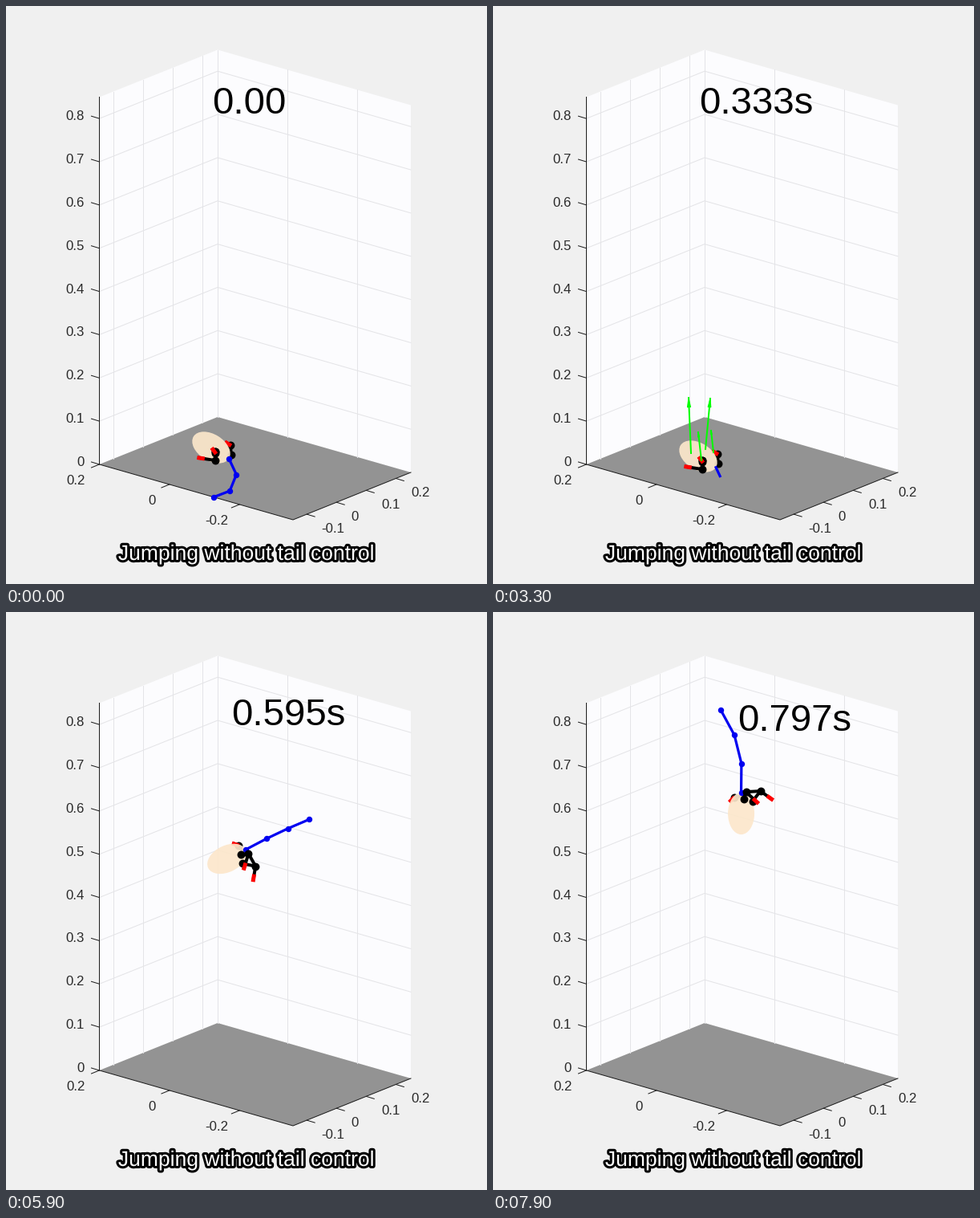
A matplotlib script for the animation above (8000 ms loop, 600 by 720 pixels).

```python
import numpy as np
import matplotlib.pyplot as plt
from matplotlib.animation import FuncAnimation
from matplotlib.patches import Ellipse, Polygon
from matplotlib.patheffects import withStroke

W, H, DPI, FRAMES = 600, 720, 100, 80
PX = 72 / DPI
DT = 0.01009
PUSH, LIFT, FREE = 38.6, 41, 45
PAPER, WALL, FLOOR = "#f0f0f0", "#fcfcfe", "#939393"
GRID, INK, SKIN = "#e4e4e7", "#1c1c1c", "#fce7cb"

plt.rcParams["font.family"] = "Liberation Sans"
plt.rcParams["text.kerning_factor"] = 6  # no kerning
fig = plt.figure(figsize=(W / DPI, H / DPI), dpi=DPI, facecolor=PAPER)
ax = fig.add_axes([0, 0, 1, 1])
ax.set_xlim(0, W)
ax.set_ylim(H, 0)
ax.axis("off")


def line(*pts, color=INK, w=1, z=1, **kw):
    x, y = zip(*pts) if pts else ((), ())
    return ax.plot(x, y, color=color, lw=w * PX, zorder=z, **kw)[0]


def label(x, y, s, size=16.7, color="#2a2a2a", **kw):
    kw = {"ha": "center", "va": "center_baseline", **kw}
    return ax.text(x, y, s, fontsize=size * PX, color=color, **kw)


def draw_box():
    left, back, right, front = (116.5, 571), (264, 512), (505, 581), (358, 640)

    def up(p, rise=457.5):
        return p[0], p[1] - rise

    def mix(p, q, t):
        return p[0] + (q[0] - p[0]) * t, p[1] + (q[1] - p[1]) * t

    for pts, color in (([up(left), up(back), back, left], WALL),
                       ([up(back), up(right), right, back], WALL),
                       ([left, back, right, front], FLOOR)):
        ax.add_patch(Polygon(pts, fc=color, ec="none", zorder=0))

    for i in range(9):
        rise = 53.85 * i
        if i:
            line(up(left, rise), up(back, rise), up(right, rise), color=GRID)
        x, y = up(left, rise)
        line((x - 10, y - 3), (x, y))
        label(98, y - 4, f"{i / 10:g}", ha="right")

    for i in range(4):
        t = 0.117 + 0.252 * i
        wall, (x, y) = mix(left, back, t), mix(front, right, t)
        line(wall, up(wall), color=GRID)
        line((x, y), (x + 10, y + 3))
        label(x + 30.5 + (i == 0) * 2 - (i == 1) * 8, y + 17, f"{i / 10 - 0.1:.2g}")

    for i in range(3):
        t = 0.362 * i
        wall, (x, y) = mix(back, right, t), mix(left, front, t)
        line(wall, up(wall), color=GRID)
        line((x, y), (x - 10, y + 4))
        label(x - 29 + (i == 1) * 7, y + 19, f"{0.2 - 0.2 * i:g}")

    line(up(left), left, front, right)


def smooth(t):
    t = np.clip(t, 0, 1)
    return t * t * (3 - 2 * t)


def heading(deg):
    """Unit vector, clockwise on screen from straight down."""
    a = np.radians(deg)
    return np.array([-np.sin(a), np.cos(a)])


def mass_center(k):
    t = k - FREE
    x = max(262.8, 264 + 1.34 * t)
    if k >= LIFT:
        return np.array([x, 475 - 16 * t + 0.27 * t * t])
    drop = min(0.27 * k * k, 11) - 11
    push = max(k - PUSH, 0) / (LIFT - PUSH)
    return np.array([x, 565.2 + drop - 22 * push ** 2])


class Leg:
    """Hip, knee and foot in body axes, blended from crouch to flight."""

    def __init__(self, crouch, flight, z):
        self.crouch, self.flight = np.array(crouch), np.array(flight)
        self.bone = line(color="black", w=4, z=z, marker="o", ms=8.5 * PX,
                         markevery=[0, 1], solid_joinstyle="round")
        self.foot = line(color="red", w=5, z=z + 0.1)

    def pose(self, air, place):
        p = place(self.crouch + (self.flight - self.crouch) * air)
        d = p[1] - p[2]
        heel = p[2] + d * min(1, 4.5 / np.hypot(*d))
        self.bone.set_data(*p.T)
        self.foot.set_data(*np.array([heel, p[2]]).T)
        return p


class Tail:
    def __init__(self):
        self.line = line(color="#0000f0", w=3.2, z=4.5, marker="o", ms=6 * PX)

    def pose(self, k, air, root):
        mean = np.interp(k, [PUSH, FREE, 64, 79], [22, 0, 332, 526])
        sway = -5.5 - 11.5 * np.cos(np.pi * (k - FREE) / 19)
        curl = 47 + (sway - 47) * air
        seg = np.interp(k, [PUSH, FREE, 50], [22, 29, 36.5])
        # only the part above the floor shows
        shown = np.interp(k, [0, 5, 9, 33, PUSH, FREE], [66, 66, 22, 12, 12, 110])
        joints = [root]
        for i in range(3):
            a = mean + curl * (i - 1)
            n = np.clip(shown - i * seg, 0, seg)
            n *= 1 - 0.3 * air * np.sin(np.radians(a)) ** 4
            joints.append(joints[-1] + n * heading(a))
        self.line.set_data(*np.array(joints).T)
        self.line.set_marker("o" if shown > seg else "")


class Arrow:
    """Ground force that shifts from its landing to its crouching value."""

    def __init__(self, foot, landing, crouch):
        self.foot = np.array(foot, float)
        self.landing, self.crouch = np.array(landing), np.array(crouch)
        self.shaft = line(color="lime", w=2, z=6)
        self.head = ax.add_patch(Polygon([(0, 0)] * 3, fc="lime", ec="lime",
                                         lw=PX, zorder=6))

    def pose(self, k):
        vec = self.landing + (self.crouch - self.landing) * np.clip((k - 11) / 22, 0, 1)
        vec = vec * (1 + 0.5 * np.exp((5 - k) / 1.5)
                     + 0.5 * np.exp(-((k - PUSH) / 1.5) ** 2))
        shown = 5 <= k < LIFT and np.hypot(*vec) > 5
        self.shaft.set_visible(shown)
        self.head.set_visible(shown)
        tip = self.foot + vec
        neck = tip - 0.17 * vec
        side = np.array([-vec[1], vec[0]]) * 0.03
        self.shaft.set_data(*np.array([self.foot, tip]).T)
        self.head.set_xy([tip, neck + side, neck - side])


draw_box()
label(300, 690, "Jumping without tail control", 26.5, "white", va="baseline",
      path_effects=[withStroke(linewidth=6 * PX, foreground="black")], zorder=9)
clock = label(0, 0, "", 47.4, "black", ha="left", va="baseline", zorder=8)

body = ax.add_patch(Ellipse((0, 0), 52, 33, fc=SKIN, ec="none", alpha=0.92, zorder=4))
far = Leg([(-26, 5), (-19, 15), (-13, 15)], [(-22, -3), (-20, 9), (-16, 13)], 3)
near = Leg([(-7, -2), (-13, -11), (6, -19)], [(-15, -14), (-28, -24), (-18, -38)], 5)
mid = Leg([(-7, -2), (-8, -3), (-3, -1)], [(-18, -3), (-27, -6), (-14, -20)], 5)
pelvis = line(color="black", w=4, z=5)
tail = Tail()
arrows = [Arrow((247, 557), (6, -107), (-3, -69)),
          Arrow((265, 552), (14, -89), (6, -63)),
          Arrow((260, 566), (0, -2), (-4, -35)),
          Arrow((275, 556), (0, -2), (-3, -27))]


def update(k):
    air = smooth((k - PUSH) / (FREE - PUSH))
    turn = 122 + 14.8 * max(k - PUSH, 0)
    axes = np.array([heading(turn), heading(turn + 90)])
    center = mass_center(k) + 8 * axes[0]

    def place(p):
        return center + p @ axes

    body.set_center(center)
    body.angle = turn + 90
    far.pose(air, place)
    knees = [leg.pose(air, place)[1] for leg in (near, mid)]
    pelvis.set_data(*np.array(knees).T)
    tail.pose(k, air, center - 26 * axes[0])
    for a in arrows:
        a.pose(k)

    shift = 1.18 * max(k - 38.4, 0)
    clock.set_position((257.2 + shift, 134.3 + 0.286 * shift))
    clock.set_text(f"{k * DT:.3g}s" if k else "0.00")
    return []


anim = FuncAnimation(fig, update, frames=FRAMES, interval=100, repeat=True,
                     repeat_delay=0, init_func=lambda: update(0))
plt.show()
```
